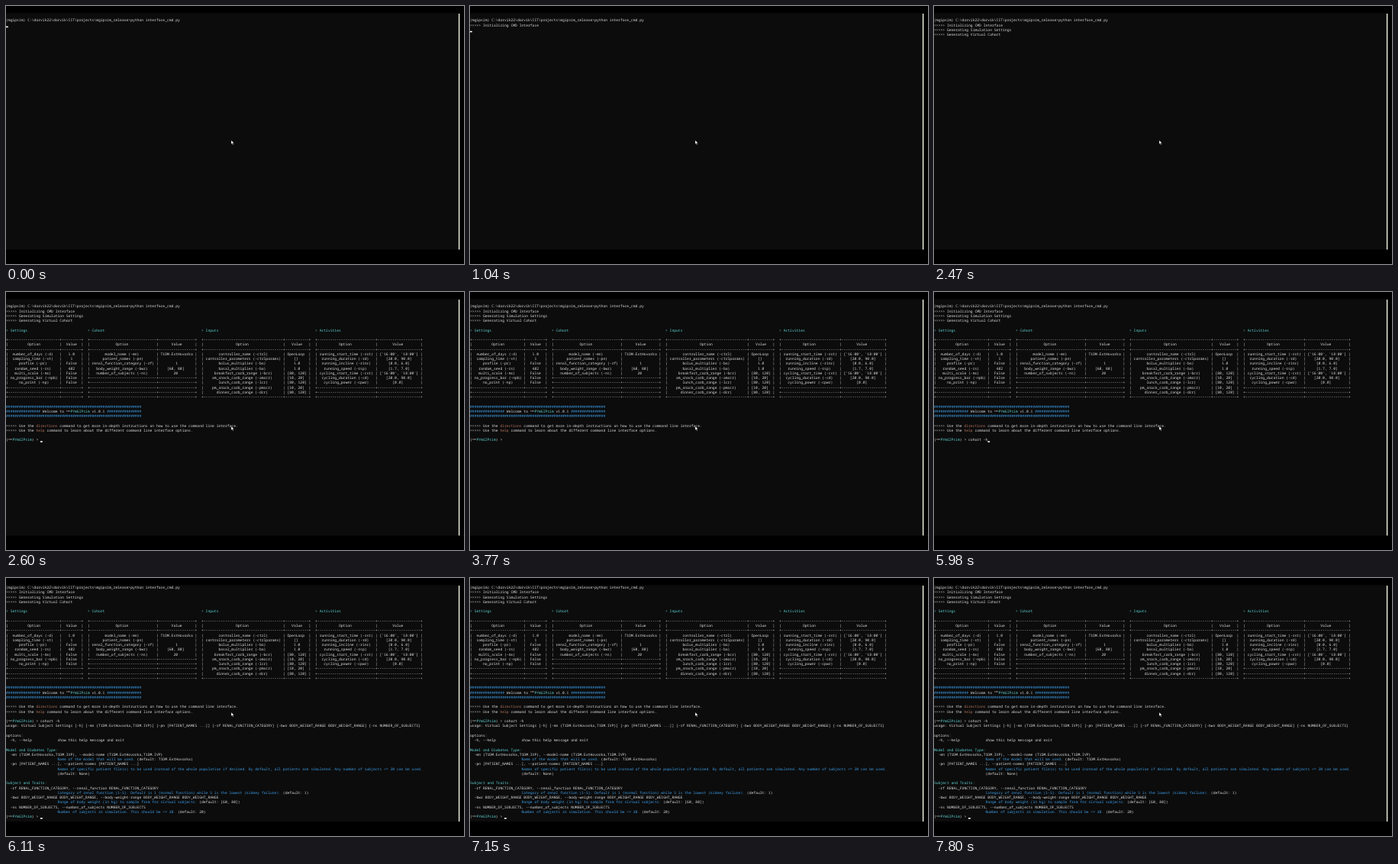
These frames come from a looping animation (600x338 px, 8 s). An HTML page:

```html
<!DOCTYPE html>
<html lang="en">
<head>
<meta charset="utf-8">
<title>Terminal session</title>
<style>
  html, body { margin: 0; width: 100%; height: 100%; overflow: hidden; background: #000; }
  /* Laid out as a 1920px wide desktop, shown at 600px. */
  #desk {
    position: absolute; left: 0; top: 0; width: 1920px; height: 1082px;
    transform: scale(.3125); transform-origin: 0 0; overflow: hidden;
  }
  #term {
    position: absolute; left: 0; top: 30px; width: 1900px; height: 991px;
    overflow: hidden; background: #0c0c0c;
  }
  #bar { position: absolute; left: 1897px; top: 32px; width: 5px; height: 989px; background: #e4e4d6; }
  #page {
    position: absolute; left: 0; top: 20px; color: #dedede;
    font: 15px/20px "Noto Sans Mono", "DejaVu Sans Mono", monospace;
    font-variant-ligatures: none; text-rendering: geometricPrecision;
  }
  #page div { height: 20px; white-space: pre; }
  #page sup { font-size: 10px; line-height: 0; vertical-align: 4px; }
  .cyan { color: #61d6d6; }
  .blue { color: #3d9ee8; }
  .red { color: #b5735f; }
  #cursor { position: absolute; width: 9px; height: 5px; background: #fff; }
  #mouse { position: absolute; left: 943px; top: 562px; }
</style>
</head>
<body>
<div id="desk">
  <div id="term"><div id="page"></div></div>
  <div id="bar"></div>
  <svg id="mouse" width="14" height="22" viewBox="0 0 14 22">
    <path d="M1 1V17L5 13.500L8 20L10.500 19L8 12.500H13Z" fill="#fff" stroke="#000"/>
  </svg>
</div>
<script>
const esc = s => s.replace(/&/g, "&amp;").replace(/</g, "&lt;").replace(/>/g, "&gt;");
const ink = (cls, s) => `<span class="${cls}">${esc(s)}</span>`;
const cyan = s => ink("cyan", s), blue = s => ink("blue", s), red = s => ink("red", s);

const LOOP = 8000, STEP = 130, CELL = 9, ROW = 20;
const PROMPT_COL = 16, TYPE_AT = 4680, RUN_AT = 6110;
const COMMAND = "cohort -h";
const LOGO = '<sup>nnn</sup><span class="cyan">PYmGIPsim</span>';
const PROMPT = `(${LOGO}) &gt; `;

const tables = [
  ["Settings", [
    ["number_of_days (-d)", "1.0"], ["sampling_time (-st)", "1"], ["profile (-pr)", "False"],
    ["random_seed (-rs)", "402"], ["multi_scale (-ms)", "False"],
    ["no_progress_bar (-npb)", "False"], ["no_print (-np)", "False"]]],
  ["Cohort", [
    ["model_name (-mn)", "T1DM.ExtHovorka"], ["patient_names (-pn)", ""],
    ["renal_function_category (-rf)", "1"], ["body_weight_range (-bwr)", "[60, 80]"],
    ["number_of_subjects (-ns)", "20"]]],
  ["Inputs", [
    ["controller_name (-ctrl)", "OpenLoop"], ["controller_parameters (-ctrlparams)", "[]"],
    ["bolus_multiplier (-bo)", "1.0"], ["basal_multiplier (-ba)", "1.0"],
    ["breakfast_carb_range (-bcr)", "[80, 120]"], ["am_snack_carb_range (-amscr)", "[10, 20]"],
    ["lunch_carb_range (-lcr)", "[80, 120]"], ["pm_snack_carb_range (-pmscr)", "[10, 20]"],
    ["dinner_carb_range (-dcr)", "[80, 120]"]]],
  ["Activities", [
    ["running_start_time (-rst)", "['16:00', '18:00']"], ["running_duration (-rd)", "[20.0, 90.0]"],
    ["running_incline (-rinc)", "[0.0, 6.0]"], ["running_speed (-rsp)", "[1.7, 7.0]"],
    ["cycling_start_time (-cst)", "['16:00', '18:00']"], ["cycling_duration (-cd)", "[20.0, 90.0]"],
    ["cycling_power (-cpwr)", "[0.0]"]]]
];

function center(s, w) {
  const left = Math.floor((w - s.length) / 2);
  return (" ".repeat(left) + s).padEnd(w);
}

// Short tables repeat their closing rule to match the tallest one.
function drawTable([, rows], height) {
  const widths = [0, 1].map(i => Math.max(7, ...rows.map(r => r[i].length)));
  const rule = "+" + widths.map(w => "-".repeat(w + 2)).join("+") + "+";
  const line = r => "| " + r.map((s, i) => center(s, widths[i])).join(" | ") + " |";
  const out = [rule, line(["Option", "Value"]), rule, ...rows.map(line)];
  while (out.length < height) out.push(rule);
  return out;
}

const drawn = tables.map(t => drawTable(t, 13));
const titles = tables.map(([name], i) => ("> " + name).padEnd(drawn[i][0].length)).join("  ");
const tableLines = drawn[0].map((_, y) => esc(drawn.map(t => t[y]).join("  ")));

const hashes = n => blue("#".repeat(n));
const note = s => esc(">>>>> " + s);
const flag = s => esc("  " + s);
const help = (s, preset = "") => " ".repeat(24) + blue(s) + preset;
const MODELS = "{T1DM.ExtHovorka,T1DM.IVP}", NAMES = "[PATIENT_NAMES ...]";
const RENAL = "RENAL_FUNCTION_CATEGORY", COUNT = "NUMBER_OF_SUBJECTS";
const WEIGHT = "BODY_WEIGHT_RANGE BODY_WEIGHT_RANGE";

const lines = [
  esc("(mgipsim) C:\\dorvik22\\dorvik\\IIT\\projects\\mgipsim_release>python interface_cmd.py"),
  note("Initializing CMD Interface"),
  note("Generating Simulation Settings"),
  note("Generating Virtual Cohort"),
  "",
  cyan(titles),
  "",
  ...tableLines,
  "",
  hashes(63),
  `${hashes(16)} Welcome to ${LOGO} v1.0.1 ${hashes(16)}`,
  hashes(63),
  "",
  note("Use the ") + red("directions") +
    " command to get more in-depth instructions on how to use the command line interface.",
  note("Use the ") + red("help") + " command to learn about the different command line interface options.",
  "",
  PROMPT + '<span id="typed"></span>',
  `usage: Virtual Subject Settings [-h] [-mn ${MODELS}] [-pn ${NAMES}] [-rf ${RENAL}] [-bwr ${WEIGHT}] [-ns ${COUNT}]`,
  "",
  "options:",
  flag("-h, --help            show this help message and exit"),
  "",
  cyan("Model and Diabetes Type:"),
  flag(`-mn ${MODELS}, --model-name ${MODELS}`),
  help("Name of the model that will be used. ", "(default: T1DM.ExtHovorka)"),
  flag(`-pn ${NAMES}, --patient-names ${NAMES}`),
  help("Names of specific patient file(s) to be used instead of the whole population if desired. " +
    "By default, all patients are simulated. Any number of subjects <= 20 can be used."),
  help("", "(default: None)"),
  "",
  cyan("Subject and Traits:"),
  flag(`-rf ${RENAL}, --renal_function ${RENAL}`),
  help("Category of renal function (1-5). Default is 1 (normal function) while 5 is the lowest (kidney failure). ",
    "(default: 1)"),
  flag(`-bwr ${WEIGHT}, --body-weight-range ${WEIGHT}`),
  help("Range of body weight (in kg) to sample from for virtual subjects. ", "(default: [60, 80])"),
  flag(`-ns ${COUNT}, --number_of_subjects ${COUNT}`),
  help("Number of subjects in simulation. This should be <= 20. ", "(default: 20)"),
  PROMPT
];

const page = document.getElementById("page");
page.innerHTML = lines.map(s => `<div>${s}</div>`).join("") + '<i id="cursor"></i>';
const rows = [...page.querySelectorAll("div")];
const typed = document.getElementById("typed");
const cursor = document.getElementById("cursor");

// [time, lines printed so far]
const prints = [[0, 1], [910, 2], [2340, 3], [2470, 4], [2600, 29], [RUN_AT, lines.length]];
const cursorOff = [
  [260, 650], [910, 1040], [1690, 1950], [2340, 2600], [2990, 3380],
  [3770, 4030], [4420, 4680], [6760, 7150], [7540, 7800]
];

function draw(t) {
  const shown = prints.filter(p => p[0] <= t).pop()[1];
  const chars = Math.max(0, Math.min(COMMAND.length, Math.floor((t - TYPE_AT) / STEP)));
  const atPrompt = shown > 4, ran = t >= RUN_AT;
  rows.forEach((r, i) => { r.style.visibility = i < shown ? "visible" : "hidden"; });
  typed.textContent = COMMAND.slice(0, chars);
  page.style.top = (ran ? 0 : ROW) + "px";

  const row = atPrompt ? shown - 1 : shown;
  const col = atPrompt ? PROMPT_COL + (ran ? 0 : chars) : 0;
  cursor.style.left = col * CELL + "px";
  cursor.style.top = row * ROW + 15 + "px";
  cursor.style.visibility = cursorOff.some(([a, b]) => t >= a && t < b) ? "hidden" : "visible";
}

const start = performance.now();
function tick() {
  draw((performance.now() - start) % LOOP);
  requestAnimationFrame(tick);
}
tick();
</script>
</body>
</html>
```
